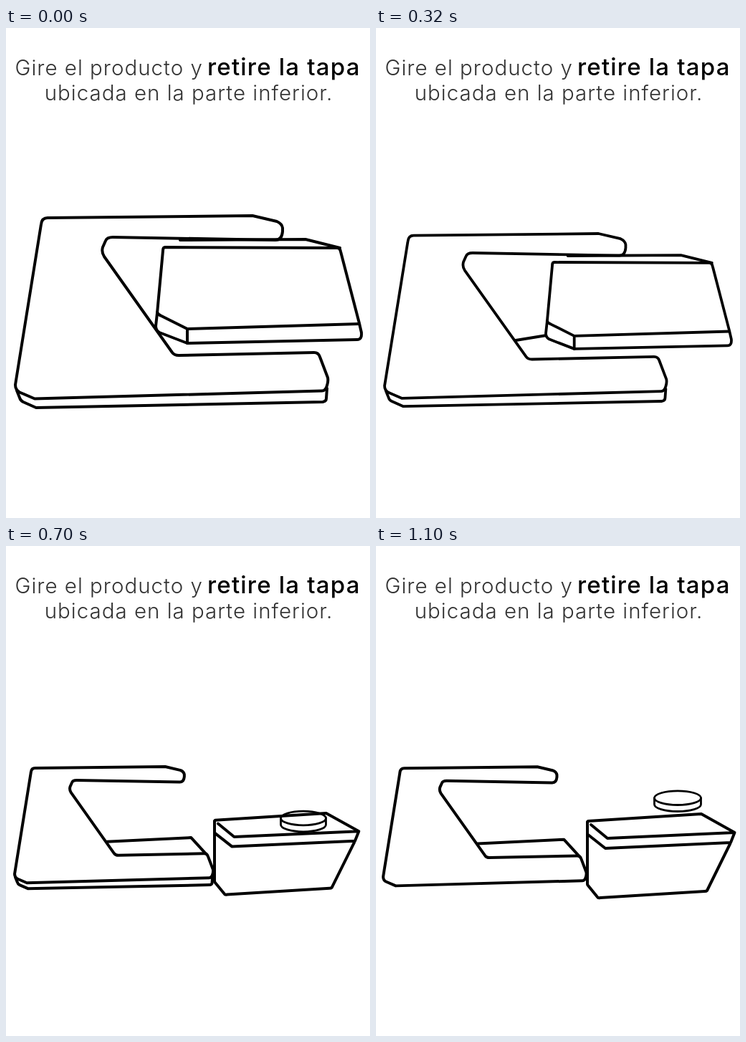
Animation of 508x684 px, one loop 1200 ms. Source, as an HTML page:

```html
<!DOCTYPE html>
<html lang="es">
<meta charset="utf-8">
<style>
html, body { margin: 0; width: 100%; height: 100%; overflow: hidden; background: #fff }
svg { display: block; width: 508px; height: 684px }
path, ellipse { stroke-linecap: round; stroke-linejoin: round; vector-effect: non-scaling-stroke }
text { font: 300 29.5px Inter, sans-serif; letter-spacing: 1px; fill: #333 }
.strong { font-size: 33px; font-weight: 500; letter-spacing: 1.2px; fill: #000 }
</style>
<svg viewBox="0 0 508 684">
  <text x="12.5" y="66">Gire el producto y</text>
  <text class="strong" x="281" y="66">retire la tapa</text>
  <text x="255" y="101" text-anchor="middle">ubicada en la parte inferior.</text>
  <g id="stage" fill="#fff" stroke="#000"></g>
</svg>
<script>
const line = d => `<path fill="none" d="${d}"/>`;
const fill = d => `<path stroke="none" d="${d}"/>`;
const shape = d => `<path d="${d}"/>`;

// Place a drawing whose own anchor is (ax, ay) at (x, y).
const place = (ax, ay) => (art, x, y, sx, sy = sx) =>
  `<g transform="translate(${x} ${y}) scale(${sx} ${sy}) translate(${-ax} ${-ay})">${art}</g>`;
const placeBase = place(13, 262), placeLid = place(209, 306), placeBox = place(294, 374);

const edge = line('M15 506L19 516Q20 520 24 522L42 530L442 522Q447 521 447 517L448 503');
const face = shape(`M58 265L344 262L378 270Q385 273 386 279V284Q385 296 376 296L149 292Q141 292 139 297
  L135 306Q133 313 137 319L232 453Q235 457 241 457L430 453Q436 453 438 459L449 488Q450 493 448 499
  Q446 506.5 441 506.5L40 517.5L19 508.5Q13 505 13 498L49 274Q50 265 58 265Z`);
const floor = line('M216 427L401 418L433 453');
const base = edge + face;

const lid = shape(`M222 306L462 307Q466 307 467 312L493 412L496 425Q497 435 490 435L253 440L214 425
  Q209 422 209 416L211 398L219 311Q219 306 222 306Z`) +
  line('M211 397Q212 400 217 402L253 420L493 413M253 420V440M243 296L418 295L466 307');

const outline = `M295 384L453 374L499.5 400L494 414L461 481Q460 482 458 482L312 491Q309 492 308 490
  L295 474Q294 473 294 472V385Z`;
const rim = fill('M299 389L322 408L499 400L494 414L319 422L295 403Z') +
  line(outline + 'M299 389L322 408L499 400M295 403L319 422L494 414');
const disc = (x, y, r = 32.5) => `<g fill="none" stroke-width="2.8"><ellipse cx="${x}" cy="${y}" rx="${r}" ry="9.8"/>
  ${line(`M${x - r} ${y}v9a${r} 9.8 0 0 0 ${2 * r} 0v-9`)}</g>`;
// The disc stands behind the front rim of the box.
const opened = (baseArt, basePos, boxPos, discPos) =>
  placeBase(baseArt + floor, ...basePos) + placeBox(fill(outline), ...boxPos) +
  disc(...discPos) + placeBox(rim, ...boxPos);

// Start time in ms, line width, drawing.
const poses = [
  [0, 4, placeBase(base, 13, 262, 1) + placeLid(lid, 209, 306, 1)],
  [200, 3.8, placeBase(base, 12, 287, .902, .9) + line('M195 436L238 429') + placeLid(lid, 237, 327, .902)],
  [400, 3, line('M158 421L253 416.5') + placeLid(lid, 253.3, 325, .853, .846) +
    '<path d="M283 325h5" stroke="#fff" stroke-width="4" style="stroke-linecap:butt"/>' +
    placeBase(base, 12, 301.8, .724)],
  [500, 4, opened(base, [9.5, 308.2, .65], [294, 374, 1], [420.5, 390])],
  [700, 4, opened(base, [12, 308, .635], [291, 373, .98, .97], [415, 380, 31.5])],
  [900, 4, opened(base, [12, 308.3, .645], [295, 374, .99], [419.5, 364])],
  [1100, 4, opened(face, [10, 308.3, .65], [295, 374, 1], [421, 351.7])]
];

const stage = document.getElementById('stage');
let shown;
function tick() {
  const t = performance.now() % 1200;
  const pose = poses.findLast(([start]) => t >= start);
  if (pose !== shown) {
    shown = pose;
    stage.setAttribute('stroke-width', pose[1]);
    stage.innerHTML = pose[2];
  }
  requestAnimationFrame(tick);
}
tick();
</script>
</html>
```
